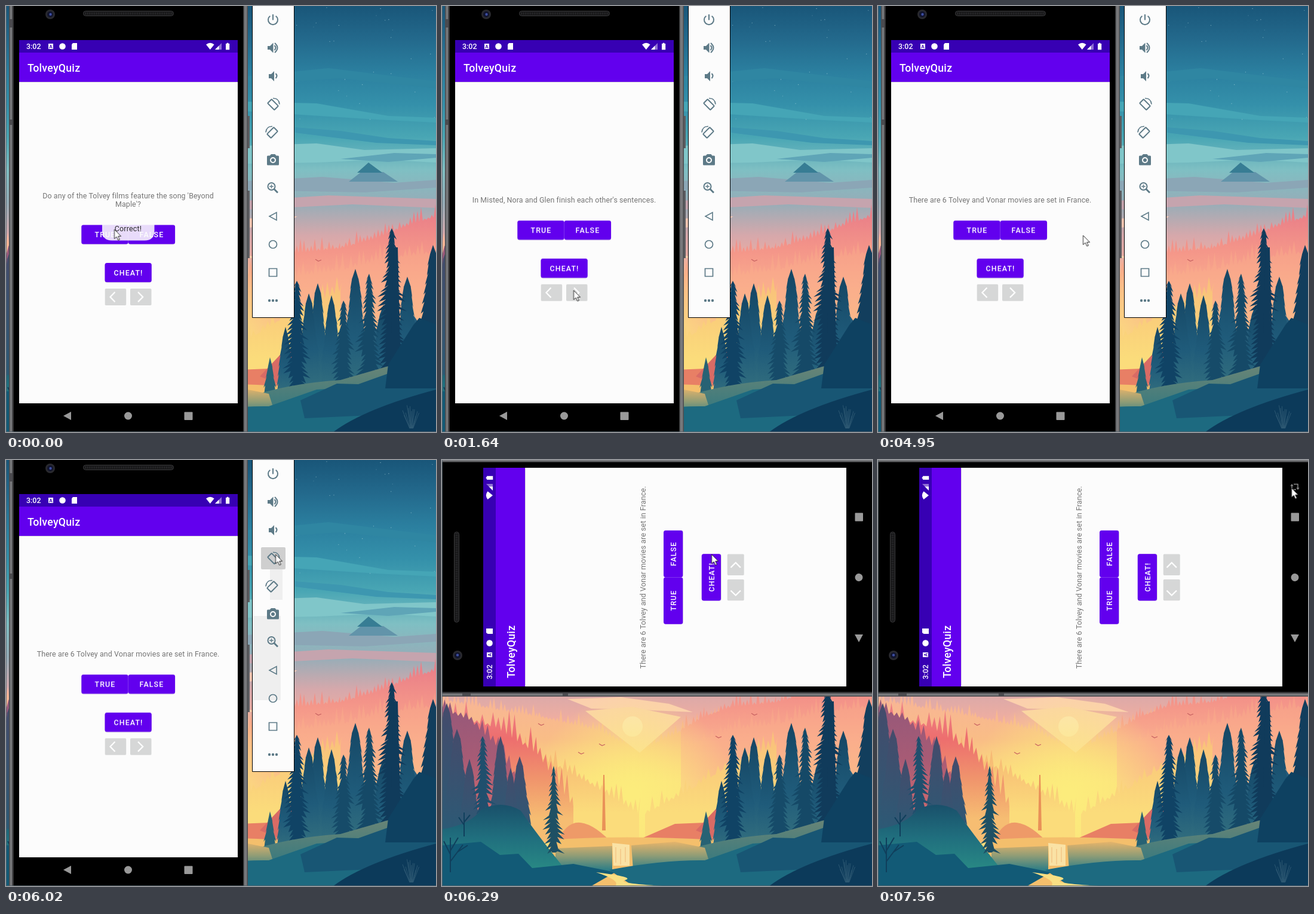
Recreate the animation shown at these times as an HTML page with a canvas. Size 720 by 713 pixels, loop 8 s.

```html
<!DOCTYPE html>
<html lang="en">
<head>
<meta charset="utf-8">
<title>Quiz app in an emulator</title>
<style>
html, body { margin: 0; width: 100%; height: 100%; overflow: hidden; background: #000; }
canvas, svg { position: absolute; left: 0; top: 0; width: 720px; height: 713px; display: block; }
text { font-family: Roboto, sans-serif; font-size: 12.45px; }
.title { font-size: 17.8px; font-weight: 500; letter-spacing: .22px; fill: #fff; }
.ask { fill: #757575; letter-spacing: .1px; text-anchor: middle; }
.label { fill: #fff; font-weight: 500; letter-spacing: 1.11px; text-anchor: middle; }
.icon { fill: none; stroke: #5d7a87; stroke-width: 2; }
.icon .solid { fill: #5d7a87; stroke: none; }
.chevron { fill: none; stroke: #fff; stroke-width: 2.2; }

.anim { animation: 8s step-end infinite; }
#device { clip-path: inset(0 0 317px 0); animation-name: device; }
#phone { animation-name: phone; }
#controls { animation-name: controls; }
#first { animation-name: first; }
#second { animation-name: second; }
#third { animation-name: third; }
#next { animation-name: next; }
#ripple { animation-name: ripple; }
#toast { animation-name: toast; }
#bar { animation-name: bar; }
#trailLow { animation-name: trailLow; }
#trailHigh { animation-name: trailHigh; }
#hover { animation-name: hover; }
#suggest { animation-name: suggest; }
#cursor { animation-name: cursor; }

@keyframes device { 0% { clip-path: none } 77.125%, 100% { clip-path: inset(0 0 317px 0) } }
@keyframes phone { 0% { transform: none } 78.625%, 100% { transform: matrix(0, -1, 1, 0, 12, 401) } }
@keyframes controls { 0% { transform: translateY(7.3px) } 14.125%, 100% { transform: none } }
@keyframes first { 0% { opacity: 1 } 14.125%, 100% { opacity: 0 } }
@keyframes second { 0% { opacity: 0 } 14.125% { opacity: 1 } 46.875%, 100% { opacity: 0 } }
@keyframes third { 0% { opacity: 0 } 46.875%, 100% { opacity: 1 } }
@keyframes next {
  0% { fill: #d6d7d7 } 14.125% { fill: #b9bbba } 15.625% { fill: #c3c5c4 }
  17.125% { fill: #cdcece } 18.625% { fill: #d6d7d7 }
  46.875% { fill: #b9bbba } 49.875%, 100% { fill: #d6d7d7 }
}
@keyframes ripple { 0% { opacity: 0 } 12.25% { opacity: .14 } 14.125%, 100% { opacity: 0 } }
@keyframes toast {
  0% { opacity: 1 } 14.125% { opacity: .85 } 15.625% { opacity: .65 }
  17.125% { opacity: .4 } 18.625% { opacity: .2 } 20.5%, 100% { opacity: 0 }
}
@keyframes bar { 0% { opacity: 1 } 78.625%, 100% { opacity: 0 } }
@keyframes trailLow { 0% { opacity: 0 } 63.75% { opacity: 1 } 77.125%, 100% { opacity: 0 } }
@keyframes trailHigh { 0% { opacity: 0 } 65.625% { opacity: 1 } 77.125%, 100% { opacity: 0 } }
@keyframes hover { 0% { opacity: 0 } 75.25% { opacity: 1 } 77.125%, 100% { opacity: 0 } }
@keyframes suggest {
  0% { opacity: 0; transform: translate(698px, 45px) rotate(90deg) }
  82.125% { opacity: .7; transform: translate(698px, 45px) rotate(90deg) }
  84% { opacity: 1; transform: translate(698px, 45px) rotate(35deg) }
  85.875%, 100% { opacity: 1; transform: translate(698px, 45px) }
}
@keyframes cursor {
  0% { transform: translate(181.5px, 374px) }
  5.375% { transform: translate(197.5px, 437px) }
  7.25% { transform: translate(215px, 470px) }
  9.125% { transform: translate(220.5px, 476px) }
  61.875% { transform: translate(343.5px, 384px) }
  63.75% { transform: translate(448.5px, 261px) }
  65.625% { transform: translate(442.5px, 216px) }
  67.125% { transform: translate(449px, 174px) }
  68.625% { transform: translate(451.5px, 158px) }
  87.75% { transform: translate(494px, 142px) }
  89.25% { transform: translate(554.5px, 114px) }
  91.125% { transform: translate(619.5px, 95px) }
  93% { transform: translate(672px, 66px) }
  94.5%, 100% { transform: translate(692.5px, 47px) }
}
</style>
</head>
<body>
<canvas id="scene" width="720" height="713"></canvas>

<svg id="device" class="anim" viewBox="0 0 720 713">
  <g id="phone" class="anim">
    <path d="M404 184h4v54h-4zM404 309h4v113h-4z" fill="#5c5d61"/>
    <path d="M5-60h400v840h-400z" fill="#4a4b4e"/>
    <path d="M6.500-60h397v840h-397z" fill="#77787b"/>
    <path d="M10.500-60h388v840h-388z" fill="#333335"/>
    <path d="M13-60h384v840h-384z"/>
    <path d="M5 190h6v9h-6zM5 22h6v14h-6z" fill="#4b4b4f"/>
    <rect x="129.500" y="8.500" width="151" height="8" rx="4" fill="#171718" stroke="#3b3b3d"/>
    <path d="M133 12.500h145" stroke="#303033" stroke-width="4" stroke-dasharray="1 2"/>
    <circle cx="74" cy="14" r="8" fill="#29292e"/>
    <circle cx="74" cy="14" r="5" fill="#11142d"/>
    <circle cx="74.500" cy="14" r="2.200" fill="#3c4da0"/>

    <path d="M22 127h366v538h-366z" fill="#fcfcfc"/>
    <path d="M22 57h366v21h-366z" fill="#3700b3"/>
    <path d="M22 78h366v49h-366z" fill="#6200ee"/>
    <path d="M22 127.500h366" stroke="#d9d5df"/>
    <text x="34" y="72.300" fill="#fff" font-weight="500">3:02</text>
    <path d="M71 63h8v9h-8z" fill="#fff"/>
    <path d="M72.700 71l2.300-6 2.300 6M73.500 69h3" fill="none" stroke="#3700b3"/>
    <circle cx="94.500" cy="67.500" r="5.300" fill="#fff"/>
    <path d="M112 62h7v11h-9v-8.500z" fill="#fff"/>
    <path d="M335 64.500q6.800-5.500 13.600 0L341.800 73z" fill="#fff"/>
    <path d="M361 62v11h-11z" fill="#8f70d4"/>
    <path d="M356.500 66.500V73H350z" fill="#fff"/>
    <path d="M368 63h1.800v-1.300h2.600V63h1.800v10.300H368z" fill="#fff"/>
    <text class="title" x="36" y="110">TolveyQuiz</text>

    <g class="ask">
      <text id="first" class="anim"><tspan x="204.500" y="321.500">Do any of the Tolvey films feature the song 'Beyond</tspan><tspan x="204.500" y="336">Maple'?</tspan></text>
      <text id="second" class="anim" x="204.500" y="328.700">In Misted, Nora and Glen finish each other's sentences.</text>
      <text id="third" class="anim" x="204.500" y="328.700">There are 6 Tolvey and Vonar movies are set in France.</text>
    </g>
    <g id="controls" class="anim">
      <g fill="#dddbe1">
        <rect x="126.300" y="360" width="78" height="32" rx="3.500"/>
        <rect x="205" y="360" width="78" height="32" rx="3.500"/>
        <rect x="165.500" y="424" width="78" height="32" rx="3.500"/>
      </g>
      <g fill="#6200ee">
        <rect x="126.300" y="359" width="78.400" height="32.300" rx="3.500"/>
        <rect x="204.700" y="359" width="78.400" height="32.300" rx="3.500"/>
        <rect x="165.500" y="422.700" width="78.300" height="32.300" rx="3.500"/>
      </g>
      <g class="label">
        <text x="166" y="379.700">TRUE</text>
        <text x="244" y="379.700">FALSE</text>
        <text x="205" y="443.500">CHEAT!</text>
      </g>
      <rect x="165.700" y="465.700" width="35.500" height="28" rx="1.800" fill="#d6d7d7"/>
      <rect id="next" class="anim" x="208" y="465.700" width="35.500" height="28" rx="1.800" fill="#d6d7d7"/>
      <circle id="ripple" class="anim" cx="222.500" cy="476.500" r="9.500"/>
      <path class="chevron" d="M182.500 471.500l-8 8.200 8 8.200M221 471.500l8.200 8.200-8.200 8.200"/>
    </g>
    <g id="toast" class="anim">
      <path d="M161 359h87.500v17q0 16.500-16.500 16.500h-54.500q-16.500 0-16.500-16.500z" fill="#fcfcfc" fill-opacity=".87"/>
      <text x="204.500" y="376.700" fill="#2b2b2b" text-anchor="middle" letter-spacing=".2">Correct!</text>
    </g>
    <g fill="#999">
      <path d="M96 686l13-7v14z"/>
      <circle cx="204.500" cy="686" r="6.500"/>
      <rect x="298.500" y="679.500" width="14" height="13.500" rx="1"/>
    </g>
  </g>
</svg>

<svg viewBox="0 0 720 713">
  <g id="bar" class="anim">
    <path d="M412.500-1h70v522.500h-70z" fill="#fcfcfc" stroke="#000"/>
    <path id="trailLow" class="anim" d="M413 261h47v141h-47z" fill="#efefef"/>
    <path id="trailHigh" class="anim" d="M442 158h21v76h-21z" fill="#efefef"/>
    <rect id="hover" class="anim" x="427" y="146" width="41" height="37" rx="2" fill="#cfcfcf"/>
    <g class="icon">
      <path d="M447 14v9.500M442.300 16.700a8 8 0 1 0 9.400 0"/>
      <path class="solid" d="M438 67h4l5.500-5.500v17L442 73h-4zM440 114h4l5-5v17l-5-5h-4z"/>
      <path d="M449.500 66q4 4 0 8M450 62q9 8 0 16M451.500 113q4 4 0 8"/>
      <g id="turn">
        <rect x="-4.700" y="-8" width="9.400" height="16" rx="1" transform="translate(447 165) rotate(-45)"/>
        <path d="M447 154.500q10-.5 11 10" stroke-width="1.700"/>
      </g>
      <use href="#turn" transform="matrix(-1 0 0 1 893 47)"/>
      <path class="solid" d="M444 248h6.500l2 2.500h3q1.500 0 1.500 1.500v13q0 1.500-1.500 1.500h-17q-1.500 0-1.500-1.500v-13q0-1.500 1.500-1.500h3z"/>
      <circle cx="447" cy="258" r="4" stroke="#fcfcfc"/>
      <circle cx="444.500" cy="302" r="6"/>
      <path d="M449 306.500l6 6" stroke-width="2.800"/>
      <path d="M444.500 298.700v6.600M441.200 302h6.600" stroke-width="1.300"/>
      <path d="M441 352l12-6.500v13z" stroke-width="1.600"/>
      <circle cx="447" cy="399" r="6.500" stroke-width="1.700"/>
      <path d="M440.500 439.500h13v13h-13z" stroke-width="1.700"/>
      <g class="solid"><circle cx="441" cy="493" r="2.200"/><circle cx="447" cy="493" r="2.200"/><circle cx="453" cy="493" r="2.200"/></g>
    </g>
  </g>
  <g id="suggest" class="anim" fill="none" stroke="#8a8a8a" stroke-width="1.500">
    <path d="M-2-4.500h7v7M2 4.500h-7v-7"/>
    <path d="M2.300 1.500h5.400L5 5zM-7.700-1.500h5.400L-5-5z" fill="#8a8a8a" stroke="none"/>
  </g>
  <path id="cursor" class="anim" d="M0 0V15.500L3.700 12.200 6.300 18 8.800 17 6.300 11.300H11z" fill="#fff" stroke="#111" stroke-width=".9"/>
  <path d="M.5 0v712.500H720" fill="none" stroke="#55656e" stroke-opacity=".8"/>
</svg>

<script>
const ctx = document.getElementById('scene').getContext('2d');
let seed = 77;
const rnd = () => (seed = seed * 16807 % 2147483647) / 2147483647;

function fade(top, bottom, ...colors) {
  const g = ctx.createLinearGradient(0, top, 0, bottom);
  colors.forEach((c, i) => g.addColorStop(i / (colors.length - 1), c));
  return g;
}

function paint(fill, path) {
  ctx.fillStyle = fill;
  ctx.fill(new Path2D(path));
}

// A jagged treeline along a crest of points, filled down to the floor.
function forest(fill, crest, height, gap, floor) {
  let d = `M${crest[0][0]} ${floor}`;
  for (let i = 1; i < crest.length; i++) {
    const [x0, y0] = crest[i - 1], [x1, y1] = crest[i];
    for (let x = x0; x < x1; x += gap) {
      const y = y0 + (y1 - y0) * (x - x0) / (x1 - x0);
      const tip = y - height * rnd() ** 1.5;
      d += `L${x} ${y + 3}L${x + gap / 2} ${tip}`;
    }
  }
  const [x, y] = crest[crest.length - 1];
  paint(fill, `${d}L${x} ${y}V${floor}Z`);
}

function pine(x, top, base, width, fill, ragged) {
  const tier = ragged > .4 ? 8 : 16;
  let left = '', right = '';
  for (let y = top + tier; y < base; y += tier) {
    const reach = width / 2 * Math.min(1, .2 + 1.3 * (y - top) / (base - top));
    const r = reach * (1 - ragged * rnd()), l = reach * (1 - ragged * rnd());
    const tuck = 1 - ragged * 1.1;
    right += `L${x + r} ${y + 3}L${x + r * tuck} ${y - 1}`;
    left = `L${x - l * tuck} ${y - 1}L${x - l} ${y + 3}` + left;
  }
  paint(fill, `M${x} ${top}${right}L${x + 3} ${base}H${x - 3}${left}Z`);
}

// Sky
const sky = fade(0, 713, '#195679', '#23698c', '#2b7f9f', '#3490aa', '#49a6b4',
  '#7fbfc3', '#95adb8', '#d6a8ab', '#f2ae9f', '#f8bd90', '#f9cd80', '#fae07b', '#f8d878', '#f0b56c');
paint(sky, 'M0 0H720V713H0Z');
for (let i = 0; i < 30; i++) {
  ctx.fillStyle = `rgba(190,225,230,${.2 + .4 * rnd()})`;
  ctx.fillRect(484 + 236 * rnd(), 190 * rnd(), 1.2, 1.2);
}
paint('#2f86a2', 'M400 118L540 104 720 126V138L560 121 400 132Z');
paint('#45a5b6', 'M400 160L520 163 640 184 720 187V195L620 190 400 176Z');
paint('#3d97b0', 'M484 203L560 209 640 221 720 226V233L620 229 484 212Z');
paint('#80c6c9', 'M400 234L520 230 600 241 720 238V262L630 257 520 262 400 264Z');
paint('#5fa5b7', 'M560 256L650 246 720 248V254L640 261Z');
paint('#8ba6b6', 'M400 293L530 286 650 296 720 291V304L600 312 400 308Z');
paint('#6294aa', 'M574 294L597 276 632 278 656 294Z');
paint('#377d94', 'M588 279L607 262 630 279Z');
paint('#c5a4ae', 'M400 326L540 317 720 323V338L580 332 400 341Z');
paint('#f3c6b2', 'M400 356L488 352 470 362 400 372Z');

// Distant woods
forest(fade(395, 540, '#f8b596', '#f9bd86', '#fbe07c'), [[0, 400], [160, 427], [260, 450], [330, 485]], 22, 6, 640);
forest(fade(395, 540, '#f6a78f', '#f9b985', '#fbe07c'), [[328, 485], [400, 452], [480, 425], [600, 410]], 22, 6, 640);
paint('#fbd0ad', 'M210 400L300 397 380 408 420 422 330 418 250 416Z');
paint('#fbd4a5', 'M240 420L318 413 400 430 331 490Z');
paint('#fce3b4', 'M302 446a17 17 0 1 0 34 0a17 17 0 1 0-34 0');
forest(fade(350, 580, '#ea8088', '#f49589', '#f9ab8d', '#f9bb88', '#fbd57e'), [[400, 450], [440, 427], [484, 411], [560, 403], [620, 386], [680, 362], [720, 350]], 22, 6, 640);
forest('#f9ae8b66', [[400, 480], [480, 450], [560, 440], [630, 422], [720, 410]], 30, 7, 640);

// Valley glow
const glow = ctx.createRadialGradient(320, 560, 10, 320, 560, 170);
glow.addColorStop(0, '#fcec7c');
glow.addColorStop(1, '#fcec7c00');
paint(glow, 'M100 396H500V713H100Z');
forest(fade(460, 590, '#f6ad72', '#fbdc7b'), [[80, 470], [170, 500], [240, 535], [330, 590]], 28, 8, 650);
forest(fade(470, 590, '#f9c27a', '#fbdc7b'), [[340, 590], [410, 553], [470, 516], [560, 475]], 28, 8, 650);
forest(fade(400, 600, '#ee858a', '#ed6e6e', '#f0946c', '#f6bd72'), [[0, 425], [90, 445], [160, 490], [220, 580]], 38, 9, 640);
forest(fade(400, 600, '#94587a', '#a75b75', '#d76b6d'), [[0, 415], [45, 432], [90, 475], [140, 560]], 34, 9, 640);
paint('#e99158', 'M270 527L272 527 274 620H268Z');
paint('#ee9a68', 'M190 645Q207 604 232 607T288 645Z');
paint('#e87f65', 'M335 633L390 609 440 607 485 578V655H300Z');
paint('#d96b65', 'M425 620L470 572 500 590V650Z');
paint('#f4bf6c', 'M180 636Q300 627 460 636V713H180Z');

// Trees on both banks
[[8, 407, 50], [25, 450, 46], [98, 462, 40], [130, 496, 40], [115, 515, 30], [46, 500, 36]].forEach(([x, y, w]) =>
  pine(x, y, 655, w, fade(y, 650, '#454b6b', '#285c77'), .15));
pine(68, 462, 620, 48, '#204f6d', .6);
forest(fade(540, 660, '#265d7c', '#3d7b84'), [[478, 590], [540, 560], [620, 540], [720, 520]], 30, 14, 690);
[[522, 464, 40], [545, 484, 38], [585, 440, 46], [507, 481, 42], [672, 453, 46], [632, 500, 46], [468, 537, 30]].forEach(([x, y, w]) =>
  pine(x, y, 665, w, fade(y, 670, '#154664', '#1f5b7a', '#3b7780'), .15));
pine(715, 400, 640, 52, '#123e5d', .2);
pine(565, 493, 650, 44, '#164b69', .5);
pine(608, 448, 640, 50, '#154967', .5);
pine(487, 460, 640, 48, '#104365', .5);
pine(646, 372, 615, 60, '#103b5b', .5);
paint('#103b5b', 'M649 404H656L661 620H643Z');
pine(442, 588, 665, 22, '#276274', .25);

// Ground and water
paint(fade(600, 690, '#6a8576', '#2e7780'), 'M405 655Q470 632 560 626L650 600 720 585V713H380Z');
paint(fade(640, 685, '#e2b36b', '#8f9c76', '#327f85'), 'M190 650L285 646V690H190ZM317 645L390 639 440 649 450 680 320 685Z');
paint('#fae2a5', 'M285 641L314 644V679H287Z');
ctx.strokeStyle = '#f0b978';
ctx.stroke(new Path2D('M291 648V674M299 651V677M307 648V673'));
paint(fade(575, 690, '#194f6a', '#206f7e', '#298b85'), 'M0 618Q48 610 66 585Q101 568 132 587Q154 620 206 685L0 713Z');
paint('#125a76', 'M0 645L65 639 97 661 128 659 151 683 220 676 290 690 250 713H0Z');
paint('#1d6a80', 'M280 686Q370 669 440 670L520 642 720 630V713H320Z');
paint('#185674', 'M493 660L554 632 590 633 646 613 720 606V680L500 690Z');
paint('#0e4161', 'M640 600L682 534 692 522 720 533V640H635Z');
paint('#0c3a5a', 'M548 713Q600 674 720 642V713Z');
paint('#f8df83', 'M258 690Q324 698 307 703T370 713H290Q300 704 258 690Z');
pine(187, 512, 657, 38, '#1e5064', .6);

// Twigs, grass and birds
ctx.strokeStyle = '#103f5c';
ctx.lineWidth = 2;
ctx.stroke(new Path2D('M14 690V632M14 660L3 638M14 654L27 632M14 672L35 644M26 656L43 645M37 630V590M37 611L28 598M37 606L47 594'));
ctx.strokeStyle = '#345f78';
ctx.lineWidth = .8;
for (let i = 0; i < 12; i++) ctx.stroke(new Path2D(`M${676 + i / 2} 707L${664 + i * 2.5} ${668 + 18 * rnd()}`));
ctx.strokeStyle = '#c76161';
ctx.lineWidth = 1.2;
[[166, 443], [233, 491], [268, 477], [463, 464], [523, 426]].forEach(([x, y]) =>
  ctx.stroke(new Path2D(`M${x - 5} ${y - 2}L${x} ${y + 1} ${x + 5} ${y - 1}`)));
</script>
</body>
</html>
```
